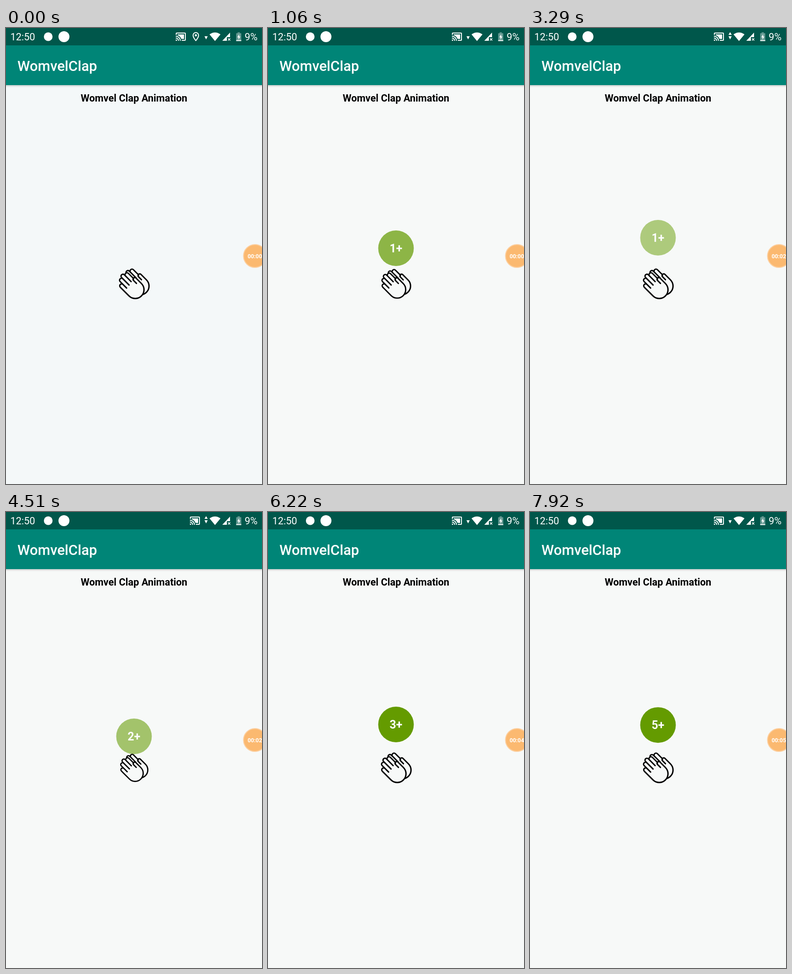
Animation, 561 px wide and 998 px high, one loop 8000 ms. Source, as an HTML page:

```html
<!DOCTYPE html>
<html lang="en">
<head>
<meta charset="utf-8">
<title>Clap animation</title>
<style>
  html, body { margin: 0; width: 100%; height: 100%; overflow: hidden; background: #f7f9f8; }
  svg { display: block; width: 100%; height: 100%; font-family: Roboto, sans-serif; }
  .bold { font-weight: 700; }
  .middle { text-anchor: middle; }
</style>
</head>
<body>
<svg viewBox="0 0 561 998">
  <defs>
    <linearGradient id="shade" x2="0" y2="1">
      <stop stop-color="#000" stop-opacity=".16"/>
      <stop offset="1" stop-color="#000" stop-opacity="0"/>
    </linearGradient>
    <path id="hand" d="M-19 0V-27a4.25 4.25 0 0 1 8.5 0V-16V-36a4.25 4.25 0 0 1 8.5 0V-17V-40a4.25 4.25 0 0 1 8.5 0V-19V-36a4.25 4.25 0 0 1 8.5 0V-20L12 -18V-8V-17a3.75 3.75 0 0 1 7.5 0V0A19.25 19.25 0 0 1-19 0Z"/>
  </defs>

  <rect id="page" width="561" height="998"/>
  <rect y="125" width="561" height="5" fill="url(#shade)"/>
  <rect y="37" width="561" height="88" fill="#008577"/>
  <rect width="561" height="38" fill="#00574b"/>

  <g fill="#fff">
    <text x="9.5" y="27" font-size="21.8">12:50</text>
    <circle cx="92.5" cy="19" r="9.5"/>
    <circle cx="127" cy="19" r="12"/>
    <path id="cast" d="M1 18v3h3c0-1.66-1.34-3-3-3zm0-4v2c2.76 0 5 2.24 5 5h2c0-3.87-3.13-7-7-7zm18-7H5v1.63c3.96 1.28 7.09 4.41 8.37 8.37H19zM1 10v2c4.97 0 9 4.03 9 9h2c0-6.08-4.93-11-11-11zm20-7H3c-1.1 0-2 .9-2 2v3h2V5h18v14h-7v2h7c1.1 0 2-.9 2-2V5c0-1.1-.9-2-2-2z"/>
    <g id="pin" transform="translate(404 7)">
      <path d="M12 3c-3.4 0-6 2.7-6 6 0 4.6 6 11.5 6 11.5S18 13.600 18 9c0-3.300-2.600-6-6-6z" fill="none" stroke="#fff" stroke-width="2"/>
      <circle cx="12" cy="9" r="2.4"/>
    </g>
    <path d="M435 18h7l-3.500 7z"/>
    <path id="upload" d="M435 15l3.500-6 3.500 6z"/>
    <path d="M446 14Q458 5.500 470 14L458 28.500z"/>
    <path d="M474 28L491 10V20H484V28z"/>
    <path d="M486.500 22.500l5 5m0-5l-5 5" stroke="#fff" stroke-width="1.500"/>
    <path d="M507.500 9.500h5v2h3v17h-11v-17h3z" opacity=".4"/>
    <path d="M504.500 26.500h11v2h-11zM511 13.500l-4 7h2.500v5l4-7h-2.500z"/>
    <text x="523" y="27" font-size="21.8">9%</text>
    <text x="25" y="93.500" font-size="31.2" font-weight="500">WomvelClap</text>
  </g>
  <text class="bold middle" x="280.500" y="161" font-size="21.8">Womvel Clap Animation</text>

  <g id="bubble">
    <circle r="39" fill="#649b00"/>
    <text id="count" class="bold middle" y="9" font-size="24.9" fill="#fff"></text>
  </g>

  <g id="hands" fill="#f7f9f8" stroke="#000" stroke-width="3" stroke-linejoin="round">
    <use href="#hand" transform="translate(294 565) rotate(-45)"/>
    <use href="#hand" transform="translate(283 573) rotate(-45)"/>
  </g>

  <circle cx="545.500" cy="499" r="25" fill="#fbb970" stroke="#fccf9f" stroke-width="2"/>
  <text id="timer" class="bold" x="529.500" y="503.500" font-size="12.3" fill="#fff"></text>
</svg>
<script>
  const LOOP = 8000, RISE = 600;
  const START_Y = 525, REST_Y = 465, EXIT_Y = 453;

  // fade: how fast opacity runs relative to the rise; leave: start of the exit
  const taps = [
    { at: 676, fade: 1, leave: 2990 },
    { at: 4186, fade: 1 },
    { at: 5403, fade: 1 },
    { at: 6374, fade: 2 },
    { at: 7374, fade: 2 }
  ];
  const ticks = [1950, 3250, 4600, 5850, 7150];

  const el = id => document.getElementById(id);
  const [page, cast, pin, upload, bubble, count, hands, timer] =
    ['page', 'cast', 'pin', 'upload', 'bubble', 'count', 'hands', 'timer'].map(el);
  const clamp = x => Math.min(1, Math.max(0, x));
  const ease = x => (1 - Math.cos(Math.PI * clamp(x))) / 2;
  const mix = (a, b, k) => a + (b - a) * k;
  const show = (node, on) => node.setAttribute('visibility', on ? 'visible' : 'hidden');

  function drawStatus(t) {
    const intro = t < 900;
    page.setAttribute('fill', t < 500 ? '#f4f8f9' : '#f7f9f8');
    cast.setAttribute('transform', `translate(${intro ? 371 : 402} 7)`);
    show(pin, intro);
    show(upload, t >= 2000 && t < 5200);
    timer.textContent = '00:0' + ticks.filter(tick => tick <= t).length;
  }

  function drawClap(t) {
    const number = taps.filter(tap => tap.at <= t).length;
    const tap = taps[number - 1];
    let y = START_Y, alpha = 0, scale = 1;
    if (tap) {
      const rise = ease((t - tap.at) / RISE);
      const exit = tap.leave ? ease((t - tap.leave) / RISE) : 0;
      y = mix(mix(START_Y, REST_Y, rise), EXIT_Y, exit);
      alpha = clamp(rise * tap.fade) * (1 - exit);
      scale = 1 - 0.55 * Math.pow(1 - rise, 2.3);
      count.textContent = number + '+';
    }
    bubble.setAttribute('transform', `translate(280.5 ${y})`);
    bubble.setAttribute('opacity', alpha);
    hands.setAttribute('transform',
      `translate(280.5 561) scale(${scale}) translate(-280.5 -561)`);
  }

  const origin = performance.now();
  function draw() {
    const t = (performance.now() - origin) % LOOP;
    drawStatus(t);
    drawClap(t);
    requestAnimationFrame(draw);
  }
  draw();
</script>
</body>
</html>
```
